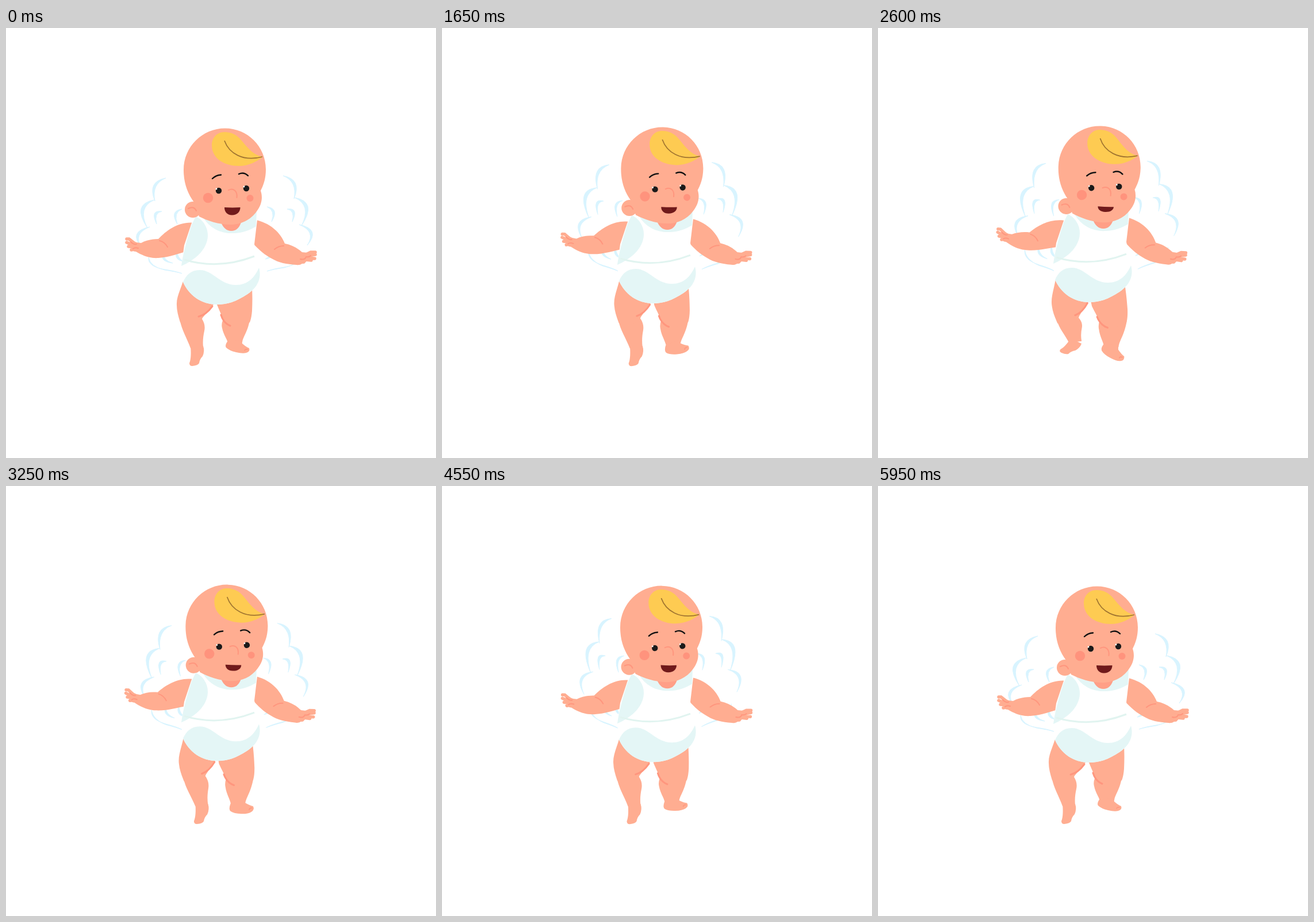
An HTML page that plays this animation: 748x748 px, repeating every 6 s.

```html
<!DOCTYPE html>
<html lang="en">
<head>
<meta charset="utf-8">
<title>Baby angel</title>
<style>
html, body { margin: 0; width: 100%; height: 100%; overflow: hidden; background: #fff; }
svg { display: block; width: 100vw; height: 100vh; }
.skin { fill: #ffad91; }
.fingers { fill: none; stroke: #ffad91; stroke-width: 5.5; stroke-linecap: round; }
.fold { fill: none; stroke: #ff967e; stroke-width: 2; stroke-linecap: round; }
.crease { stroke-width: 3; }
.shade { fill: #e4f6f6; }
.feather { fill: #d8f4ff; stroke: #d8f4ff; stroke-width: 1; stroke-linejoin: round; }
.brow { fill: none; stroke: #111; stroke-width: 2.4; stroke-linecap: round; }
</style>
</head>
<body>
<svg viewBox="0 0 748 748">
  <defs>
    <g id="wing" class="feather">
      <path d="M278 261Q245 267 259 301Q253 271 278 261Z"/>
      <path d="M258 299Q218 306 246 348Q228 312 258 299Z"/>
      <path d="M250 346Q212 354 236 382Q220 358 250 346Z"/>
      <path d="M271 319Q250 316 262 341Q257 321 271 319Z"/>
      <path d="M306 315Q284 318 298 341Q291 321 306 315Z"/>
      <path d="M248 399Q246 415 276 420Q296 423 306 427Q296 424 276 421Q251 415 248 399Z"/>
      <path d="M274 391Q266 406 290 409Q273 404 274 391Z"/>
      <path d="M298 386Q290 403 309 406Q297 400 298 386Z"/>
    </g>
  </defs>

  <g class="flap"><use href="#wing"/></g>
  <g transform="matrix(-1 0 0 1 760 -4)"><g class="flap"><use href="#wing"/></g></g>

  <g id="armL">
    <path class="skin" d="M330 339C302 335 280 351 265 367C255 367 244 369 235 374Q228 374 222 371Q216 378 219 386Q221 389 226 389C238 396 250 401 265 400C285 399 300 392 320 387Z"/>
    <path class="fingers" d="M224 375L214 367L210 367M222 378L210 373M222 381L213 380M226 384L218 386"/>
    <path class="fold" d="M267 370Q276 372 281 381M217 372Q222 377 227 376M221 384Q224 381 230 383"/>
  </g>
  <g id="armR">
    <path class="skin" d="M430 333C460 338 478 357 485 375C496 377 506 382 515 390L526 391Q530 398 524 404Q520 410 515 410Q511 413 505 412C488 411 474 408 464 402C450 395 440 386 428 373Z"/>
    <path class="fingers" d="M520 395L530 390L538 390M522 397L538 394M522 400L537 401M520 403L531 404M512 406L518 407"/>
    <path class="fold" d="M467 385Q474 379 483 379M512 402Q520 404 522 398M522 398Q527 399 530 396"/>
  </g>

  <g id="thighL">
    <g id="shinL">
      <path class="skin" d="M302 500C302 520 314 537 321 557L343 555C342 545 343 536 345 527C347 518 344 510 340 505Q322 490 302 500Z"/>
      <path id="footL" class="skin" d="M321 554C322 564 322 576 319 583Q319 588 324 588Q334 587 336 583Q337 576 342 571Q346 562 343 553Z"/>
    </g>
    <path class="skin" d="M312 425C308 448 296 465 297 482C297 492 300 502 303 512Q322 524 340 508L342 504L361 481L366 435Z"/>
    <path class="fold crease" d="M359 484Q348 499 335 502"/>
  </g>
  <g id="thighR">
    <g id="shinR">
      <path class="skin" d="M378 506Q374 515 376 522C378 533 384 540 386 548L411 547C412 537 420 530 424 508Q400 492 378 506Z"/>
      <g id="footR">
        <path class="skin" d="M386 544Q380 552 383 556Q388 561 400 564Q412 567 418 565Q425 563 423 557Q418 555 411 549L410 543Z"/>
        <path class="fold" style="stroke-width:1.4" d="M415 561Q416 558 420 559"/>
      </g>
    </g>
    <path class="skin" d="M424 425C429 445 429 470 428 492Q427 505 424 512Q400 526 378 512C377 502 371 492 367 481L362 435Z"/>
    <path class="fold crease" d="M374 499Q378 513 390 518"/>
  </g>

  <g id="torso">
    <path fill="#fff" d="M328 326L322 342L310 378L305 414L307 440C318 465 340 481 367 481C385 481 400 476 420 463C438 451 445 435 440 417L432 376L437 334L436 318Z"/>
    <path class="shade" d="M330 328C344 333 352 350 351 362C350 386 328 404 305 414C307 398 313 372 323 342Z"/>
    <path class="shade" d="M342 328C354 349 375 358 395 357C412 357 425 351 435 345L436 318Z"/>
    <path d="M310 403Q370 421 432 397" fill="none" stroke="#e1f4f0" stroke-width="3"/>
    <path class="shade" d="M308 442C313 430 322 421 337 421C360 421 372 447 400 447C420 447 432 435 440 417C445 435 438 451 420 463C400 476 385 481 367 481C340 481 318 465 308 442Z"/>
    <path fill="#ff9f87" d="M374 338Q380 353 392 353Q404 353 409 338Z"/>
  </g>

  <g id="head">
    <circle class="skin" cx="325" cy="316" r="14"/>
    <path class="skin" d="M381 174.5C420 174.5 452 206 452 246C452 262 448 273 443 283C447 295 445 307 436 319C425 335 407 342 390 342C370 342 350 335 336 328L327 303C316 288 309 270 309 247C309 206 342 174.5 381 174.5Z"/>
    <path class="fold" d="M317 314Q327 309 331 318"/>
    <path fill="#fecb52" d="M380 181C366 181 358 192 358 204C358 227 380 240 405 240C422 240 438 232 446 224C430 221 420 208 410 196C402 186 392 181 380 181Z"/>
    <path d="M380 196C388 218 412 233 446 224" fill="none" stroke="#a07430" stroke-width="1.7"/>
    <path class="brow" d="M359 262Q365 256 374 255.500M405 254Q414 250 421 257"/>
    <g fill="#ff937d"><circle cx="351.500" cy="295.500" r="8.700"/><circle cx="424.500" cy="296" r="6"/></g>
    <path class="fold" d="M387 282C395 278 403 283 401.500 295"/>
    <g id="eyes">
      <g fill="#1a1a1a"><circle cx="370" cy="283" r="5.200"/><circle cx="418" cy="279" r="5.200"/></g>
      <g fill="#fff"><circle cx="366" cy="280" r="1.400"/><circle cx="414" cy="276" r="1.400"/></g>
    </g>
    <path id="mouth" fill="#701a1b"/>
  </g>
</svg>
<script>
const $ = s => document.querySelector(s);
const STEP = 50, FRAMES = 60, SPAN = FRAMES - 1;
const BOBS = 2, FLAPS = 3;

const triangle = u => 1 - Math.abs(2 * u - 1);
const bump = (u, skew) => Math.sin(Math.PI * u ** skew);

// Turn and stretch a part about its joint, after lifting it by dy.
function joint(id, cx, cy, turn, stretch = 1, dy = 0) {
  $(id).setAttribute('transform',
    `translate(${cx} ${cy + dy}) rotate(${turn}) scale(1 ${stretch}) translate(${-cx} ${-cy})`);
}

const shift = (id, x, y) => $(id).setAttribute('transform', `translate(${x} ${y})`);

function drawMouth(p) {
  const top = 312 + 5 * p, low = 325.5 - 4 * p, mid = top + (low - top) * 0.6;
  $('#mouth').setAttribute('d',
    `M380 ${top}Q394 ${top + 0.8} 407.500 ${top}C407.500 ${mid} 402 ${low} 393 ${low}C385 ${low} 380 ${mid} 380 ${top}Z`);
}

function drawWings(q) {
  const m = [1 - 0.092 * q, 0.158 * q, -0.085 * q, 1 + 0.157 * q, 0, 0];
  document.querySelectorAll('.flap').forEach(w => w.setAttribute('transform',
    `translate(${306 + 2.8 * q} ${426 - 5.5 * q}) matrix(${m}) translate(-306 -426)`));
}

function draw(frame) {
  const u = frame * BOBS / SPAN % 1;
  const p = triangle(u);
  const tuck = bump(u, 2.5), kick = bump(1 - u, 6);
  const rise = -8.3 * p;

  drawWings(triangle(frame * FLAPS / SPAN % 1));

  shift('#torso', 0, rise);
  joint('#head', 390, 387, 4.1 * p, 1, -8 * p);
  shift('#eyes', -5 * p, -0.5 * p);
  drawMouth(p);

  joint('#armL', 322, 349.5, 13 * p, 1 - 0.12 * p, -9 * p);
  joint('#armR', 437, 340, 6 * p, 1, rise);

  joint('#thighL', 338, 440, -14.8 * p, 1 + 0.06 * p, rise);
  joint('#shinL', 322, 508, 7 * p, 1 - 0.2 * tuck);
  joint('#footL', 332, 556, 34 * tuck + 7 * p);

  joint('#thighR', 400, 440, -13.3 * p, 1 + 0.18 * p, rise);
  joint('#shinR', 400, 512, 18 * p, 1 + 0.15 * p);
  joint('#footR', 398, 547, 18 * p - 24 * kick);
}

const start = performance.now();
function tick() {
  draw(Math.floor((performance.now() - start) / STEP) % FRAMES);
  requestAnimationFrame(tick);
}
tick();
</script>
</body>
</html>
```
